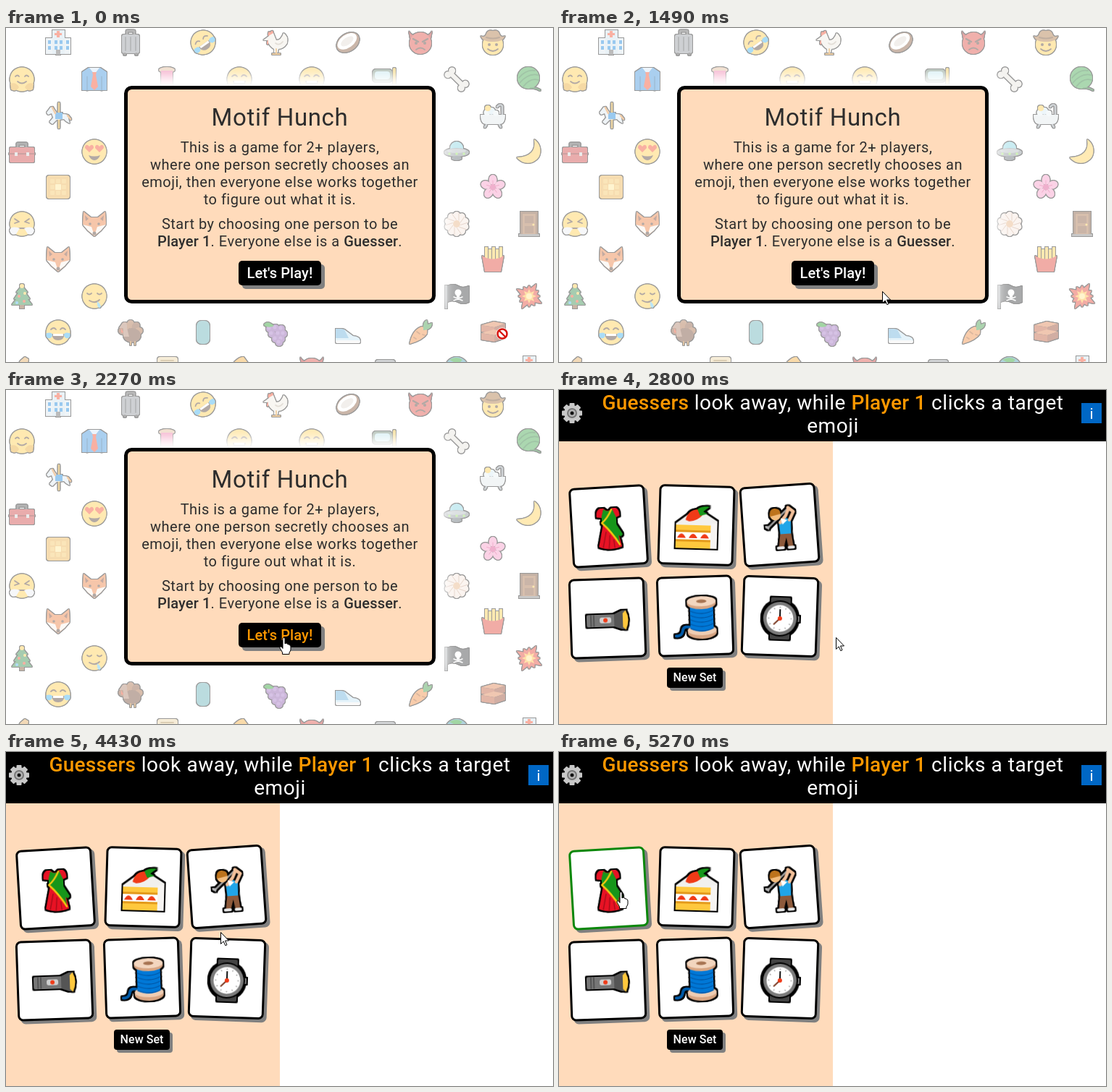
Animation of 755x462 px, one loop 8 s. Source, as an HTML page:

```html
<!DOCTYPE html>
<html lang="en">
<head>
<meta charset="utf-8">
<title>Motif Hunch</title>
<style>
html, body { margin: 0; width: 100%; height: 100%; overflow: hidden; background: #fff; }
svg { display: block; }
text { font-family: Roboto, "Open Sans", sans-serif; letter-spacing: .025em; text-anchor: middle; fill: #2d2d2d; white-space: pre; }
.big { font-size: 33px; letter-spacing: .02em; }
.body { font-size: 20px; }
.strong { font-weight: 500; letter-spacing: .008em; }
.head { font-size: 28px; letter-spacing: .02em; fill: #fff; }
.hot { fill: #ff9800; }
.btn { fill: #fff; }
.label { font-weight: 500; letter-spacing: .005em; }
#wall { opacity: .4; filter: drop-shadow(1px 0 0 #000) drop-shadow(-1px 0 0 #000) drop-shadow(0 1px 0 #000) drop-shadow(0 -1px 0 #000); }
.pic { filter: drop-shadow(2px 0 0 #000) drop-shadow(-2px 0 0 #000) drop-shadow(0 2px 0 #000) drop-shadow(0 -2px 0 #000); }
.face { fill: #fff; stroke: #000; stroke-width: 3; }
.on .face { stroke: #0a870a; }
#glow { filter: blur(8px); }
</style>
</head>
<body>
<svg width="755" height="462" viewBox="0 0 755 462">
  <g id="intro">
    <rect width="755" height="462" fill="#fff"/>
    <g id="wall"></g>
    <rect id="glow" x="150" y="67" width="456" height="327" rx="14" fill="#fff"/>
    <rect x="165.500" y="82.500" width="425" height="296" rx="8" fill="#ffdbbb" stroke="#000" stroke-width="5"/>
    <text class="big" x="378" y="135">Motif Hunch</text>
    <g class="body">
      <text x="378" y="172">This is a game for 2+ players,</text>
      <text x="378" y="196">where one person secretly chooses an</text>
      <text x="378" y="220">emoji, then everyone else works together</text>
      <text x="378" y="244">to figure out what it is.</text>
      <text x="378" y="278">Start by choosing one person to be</text>
      <text x="378" y="302"><tspan class="strong">Player 1</tspan>. Everyone else is a <tspan class="strong">Guesser</tspan>.</text>
      <rect x="326" y="327" width="114" height="34" rx="5" fill="#808080"/>
      <rect x="321" y="322" width="114" height="34" rx="5"/>
      <text id="play" class="btn label" x="378" y="346">Let's Play!</text>
    </g>
  </g>
  <g id="game">
    <rect width="755" height="462" fill="#fff"/>
    <rect y="71" width="378" height="391" fill="#ffdbbb"/>
    <rect width="755" height="71"/>
    <text class="head" x="378" y="27"><tspan class="hot strong">Guessers</tspan> look away, while <tspan class="hot strong">Player 1</tspan> clicks a target</text>
    <text class="head" x="378" y="59">emoji</text>
    <g id="gear" transform="translate(18 32)"></g>
    <rect x="721" y="18" width="28" height="28" fill="#0067c5"/>
    <text x="735.300" y="40" font-size="21" style="fill:#fff">i</text>
    <g id="cards"></g>
    <rect x="153" y="388" width="77" height="28" rx="4" fill="#808080"/>
    <rect x="149" y="384" width="77" height="28" rx="4"/>
    <text class="btn label" x="187.500" y="403" font-size="16">New Set</text>
  </g>
  <g id="cursor">
    <g id="ban" fill="none" stroke="#fff" stroke-width="4">
      <circle r="6.500" fill="#fff"/>
      <path d="M-4.500-4.500L4.500 4.500M6.500 0A6.500 6.500 0 1 1 6.500-.01" stroke="#d8140c" stroke-width="2.400"/>
    </g>
    <path id="arrow" d="M.5.5V16.500L4.200 13L6.800 18.700L9 17.700L6.500 12H11.500Z" fill="#fff" stroke="#000"/>
    <path id="hand" d="M-2 2Q-2 .5-.5 .5Q1 .5 1 2V9Q2 7.800 3.500 8.600Q4.700 8.500 5 10Q6.700 9 7.400 11Q9 10.500 9 13V17Q9 19 7 21V23.500H-2.500V21Q-4 18-6 15Q-6.500 12.500-4.500 13Q-3 13.500-2 15.500Z" fill="#fff" stroke="#000"/>
  </g>
</svg>
<script>
const $ = id => document.getElementById(id);

// shape helpers
const c = (x, y, r, f) => `<circle cx="${x}" cy="${y}" r="${r}" fill="${f}"/>`;
const e = (x, y, rx, ry, f) => `<ellipse cx="${x}" cy="${y}" rx="${rx}" ry="${ry}" fill="${f}"/>`;
const b = (x, y, w, h, f, r = 0) => `<rect x="${x}" y="${y}" width="${w}" height="${h}" rx="${r}" fill="${f}"/>`;
const p = (d, f) => `<path d="${d}" fill="${f}"/>`;
const l = (d, s, w = 1.8) => `<path d="${d}" fill="none" stroke="${s}" stroke-width="${w}" stroke-linecap="round" stroke-linejoin="round"/>`;
const g = (t, s) => `<g transform="${t}">${s}</g>`;
const ring = (n, fn) => Array.from({ length: n }, (_, i) => g(`rotate(${360 / n * i})`, fn(i))).join('');

const Y = '#ffc83d', K = '#402a20', R = '#f03a17', G = '#16961a', B = '#0078d7', W = '#fff';
const ball = c(0, 0, 16.5, Y);
const grin = p('M-9 2H9Q8 11 0 11Q-8 11-9 2Z', K) + b(-7, 2, 14, 3, W);
const shut = l('M-10-4Q-6-8-3-4M3-4Q6-8 10-4', K);
const laugh = ball + grin + shut;
const tear = f => p('M-16 1Q-8-1-8 4Q-9 9-14 8Q-18 6-16 1Z', f);
const petals = (n, f) => ring(n, () => e(0, -10, 5.5, 7, f));
const roof = '#c9dce8';

const icons = {
  hospital: b(-17, -6, 34, 22, '#d8e4ec') + b(-8, -17, 17, 33, roof) + p('M-2-16H2V-13H5V-10H2V-7H-2V-10H-5V-13H-2Z', R)
    + [-14, -5, 2, 11].map(x => b(x, -3, 4, 5, B) + b(x, 5, 4, 5, B)).join('') + b(-3, 10, 6, 7, '#555'),
  bag: l('M-5-10V-16H5V-10', '#555', 2.500) + b(-12, -11, 24, 26, '#858b91', 3) + l('M-7-7V11M0-7V11M7-7V11', '#4e5358', 2) + c(-8, 16, 2, '#333') + c(8, 16, 2, '#333'),
  rofl: g('rotate(-35)', laugh + tear('#2aa8ea') + g('scale(-1 1)', tear('#2aa8ea'))),
  rooster: p('M-17-3L-9-9Q-8-15-3-13L1-3Q8-3 11-13Q18-9 16 1Q11 9 4 9L3 14H-2V9Q-9 5-11-3Z', '#eee9df') + p('M-10-9Q-11-17-7-14Q-4-19-3-13ZM-10-4Q-14 2-10 3Z', R) + l('M1 9V16H-4M1 16H6', '#d88614') + l('M0 1Q5 5 10-1', '#b9ad9c'),
  coconut: g('rotate(-35)', e(0, 0, 17, 12, '#7a4a2a') + e(0, -2, 15, 9, '#fff') + e(0, -2, 10, 5, '#ded8d0')),
  imp: p('M-16-16Q-13-10-8-10L-14-5ZM16-16Q13-10 8-10L14-5Z', '#b8201d') + c(0, 1, 15, '#d93a31') + l('M-10-5L-3-1M10-5L3-1', K, 2.500) + c(-6, 1, 2, K) + c(6, 1, 2, K) + l('M-6 10Q0 5 6 10', K),
  cowboy: c(0, 3, 14, Y) + c(-5, 3, 2, K) + c(5, 3, 2, K) + l('M-7 9Q0 15 7 9', K) + p('M-17-9Q-11-6-9-12Q-7-18 0-16Q7-18 9-12Q11-6 17-9Q13 0 0-1Q-13 0-17-9Z', '#a4662e') + l('M-9-7Q0-4 9-7', '#633713', 2),
  hug: ball + l('M-9-4Q-6-7-4-4M4-4Q6-7 9-4M-6 3Q0 8 6 3', K) + p('M-16 6Q-8 3-4 11Q-9 18-15 14ZM16 6Q8 3 4 11Q9 18 15 14Z', '#e6a01c'),
  shirt: p('M-8-16H8L17-10V15H-17V-10Z', '#2b88d8') + l('M-10-4V15M10-4V15', '#0b4f8a', 1.200) + p('M-7-16H7L0-7Z', '#cfe4f7') + p('M-3-10H3L2-6L5 10L0 15L-5 10L-2-6Z', R),
  spool: e(0, -13, 11, 4, '#d9ac84') + b(-8, -12, 16, 22, '#e8538f') + e(0, 12, 11, 4, '#d9ac84'),
  mask: b(-16, -14, 27, 18, '#4b6b55', 5) + b(-13, -11, 21, 11, '#a8dbe6', 4) + l('M14-14V12H0', '#e6b51c', 4),
  bone: g('rotate(45)', b(-12, -3, 24, 6, '#e4e0da') + [-13, 13].map(x => c(x, -4, 4.500, '#e4e0da') + c(x, 4, 4.500, '#e4e0da')).join('')),
  yarn: c(-1, -2, 15, '#2f9b3b') + l('M-14-2Q-4-14 8-12M-13 5Q-1-9 12-6M-8 10Q2-3 13 1M2 12Q9 11 15 15', '#126b22'),
  horse: l('M1-17V17', '#d49b1a', 2.500) + p('M-16-4L-10-12L-5-8L-1-2H9Q15-2 14 4L16 11L11 8L8 5L-2 6L-8 12L-12 9L-7 3L-9-3L-14-1Z', '#d8e3ea') + p('M-4-4H6V5H-4Z', B) + l('M-8-11L-4-3M13 0L17 5', '#e0862a', 2.500),
  bath: p('M-17-1H17Q17 12 9 12H-9Q-17 12-17-1Z', '#dfe5e9') + l('M-9 13L-11 16M9 13L11 16M13-2V-13Q10-17 6-12', '#8a949b', 2.500) + c(-8, -4, 4.500, '#e7eff3') + c(-2, -6, 5, '#d1e8f2') + c(4, -3, 4, '#e7eff3') + c(-7, -10, 4, Y),
  tool: l('M-6-7V-11H6V-7', '#444', 3) + b(-17, -6, 34, 21, '#c93131', 2) + l('M-17 3H17', '#7f1616', 2) + b(-10, 1, 4, 5, '#ccc') + b(6, 1, 4, 5, '#ccc'),
  love: ball + p('M-7 1L-13-5Q-13-10-9-9L-7-7L-5-9Q-1-10-1-5ZM7 1L13-5Q13-10 9-9L7-7L5-9Q1-10 1-5Z', R) + p('M-8 5Q0 8 8 5Q5 12 0 12Q-5 12-8 5Z', K),
  ufo: e(0, -5, 9, 9, '#7cd0df') + e(0, 1, 17, 6, '#7c858b') + e(0, -1, 13, 3, '#a9b2b7') + [-10, 0, 10].map(x => c(x, 3, 1.800, '#8be04e')).join('') + e(0, 9, 7, 3, '#4e5a63'),
  moon: p('M7-17Q11 7-17 8Q-9 18 4 15Q18 9 15-6Q13-13 7-17Z', '#ffcb45'),
  waffle: b(-16, -16, 32, 32, '#e8a93a', 4) + [-11, -3, 5].map(x => [-11, -3, 5].map(y => b(x, y, 6, 6, '#f2bd50', 1)).join('')).join('') + b(-4, -4, 8, 8, '#ffe48a', 1),
  blossom: petals(5, '#f58fc0') + c(0, 0, 4, '#d83b83') + ring(5, () => l('M0-4V-9', '#d83b83', 1)),
  steam: ball + l('M-10-7L-4-3L-10-1M10-7L4-3L10-1M-4 6H4', K) + p('M-3 6Q-15 2-17 9Q-15 17-8 14ZM3 6Q15 2 17 9Q15 17 8 14Z', '#e8ecef'),
  fox: p('M-15-17L-5-9H5L15-17L16 0L9 9L0 17L-9 9L-16 0Z', '#e8722b') + p('M-16 1L-4 4L0 16L-9 9ZM16 1L4 4L0 16L9 9Z', '#f7efe8') + p('M-13-12L-8-7L-12-4ZM13-12L8-7L12-4Z', '#6b2f17') + c(-6, 0, 1.800, K) + c(6, 0, 1.800, K) + c(0, 13, 2.500, K),
  daisy: petals(10, '#f4e4da') + ring(10, () => l('M3-5V-15', '#b98b72', .8)) + c(0, 0, 5, '#e4ab76'),
  door: b(-12, -17, 24, 33, '#6d3f22') + b(-9, -14, 18, 30, '#9c5f34') + b(-6, -11, 12, 10, '#7a4726') + b(-6, 3, 12, 10, '#7a4726') + c(6, 1, 1.500, Y) + b(-14, 14, 28, 3, '#777'),
  fries: [-11, -6, -1, 4, 9].map((x, i) => b(x, -17 + i % 2 * 3, 4, 20, Y)).join('') + p('M-15-5Q0 4 15-5L11 17H-11Z', '#dc3022'),
  tree: b(-3, 10, 6, 7, '#75451f') + p('M0-15L8-5H5L11 4H8L14 12H-14L-8 4H-11L-5-5H-8Z', '#22813b') + c(0, -14, 3, Y) + c(-4, 0, 2, R) + c(4, -4, 2, Y) + c(3, 7, 2, R) + c(-7, 9, 2, '#3aa7e8'),
  drool: ball + l('M-10-4Q-7-1-4-4M4-4Q7-1 10-4M-7 6Q1 11 7 5', K) + p('M4 7Q11 13 8 16Q3 17 4 7Z', '#54bdec'),
  flag: b(-16, -15, 3, 32, '#70767a') + p('M-13-14Q-4-18 2-14T17-14V8Q9 12 2 8T-13 8Z', '#26282b') + c(2, -5, 4.500, W) + b(0, -2, 4, 4, W) + l('M-4 1L8 6M8 1L-4 6', W, 1.500),
  boom: ring(12, i => p(i % 3 === 1 ? 'M-5-7L0-20L5-7Z' : 'M-5-7L0-15L5-7Z', '#e0301e')) + c(0, 0, 9, '#e0301e') + ring(8, () => p('M-3-3L0-10L3-3Z', '#ffb52c')) + c(0, 0, 4, '#ffe482'),
  joy: laugh + tear('#2aa8ea') + g('scale(-1 1)', tear('#2aa8ea')),
  turkey: ring(9, i => i > 2 && i < 7 ? '' : e(0, -11, 5, 6, i % 2 ? '#7e4526' : '#9f5b31')) + e(2, 4, 12, 10, '#64351f') + p('M-11-13Q-4-16-5-6L-2 6H-10L-10-6L-16-6Z', '#a6735a') + p('M-13-6Q-14 3-10 0Z', R) + l('M0 13V17M6 13V17', '#c77b20'),
  figure: b(-9, -16, 18, 32, '#55a9b0', 7),
  grapes: [[-8, -5], [0, -6], [8, -5], [-5, 2], [4, 2], [11, 2], [0, 9], [8, 9], [5, 14]].map(([x, y]) => c(x, y, 5, '#804ca3') + c(x - 1, y - 1, 2.500, '#9a68bd')).join('') + p('M-2-9Q-12-18-16-10Q-10-5-2-9Z', G),
  shoe: p('M-17-5H-11L-5-4L7 5Q17 6 17 12H-17Z', '#bfe0f2') + p('M-17-5H-11L-5-4L1 8H-17Z', '#5aa9d6') + b(-17, 11, 34, 4, '#f1f1f1', 2),
  carrot: p('M-15 16Q-11-4 2-8Q11-6 9 2Q3 11-15 16Z', '#ee802e') + p('M4-5Q3-15 9-17L10-11L16-13Q16-4 4-3Z', '#2e9236') + l('M-5-1L-1 2M-9 7L-6 9M3 3L6 4', '#a64c10'),
  bricks: [-12, -1].map(y => p(`M-16 ${y + 2}L1 ${y - 3}L17 ${y}L2 ${y + 5}Z`, '#d9743d') + p(`M-16 ${y + 2}L2 ${y + 5}V${y + 14}L-16 ${y + 11}Z`, '#b64a25') + p(`M2 ${y + 5}L17 ${y}V${y + 9}L2 ${y + 14}Z`, '#8c3519')).join(''),
  bread: p('M-2-11L4-16L9-13L8-7Q13 0 9 12H-7Q-10 0-2-11Z', '#dfa04b'),
  scroll: b(-13, -16, 28, 30, '#e9d09b', 4) + l('M-8-11H9', '#a78445'),
  fruit: p('M-7-9Q1-17 6-16Q9-12 14-5Q15 15 0 15Q-15 13-7-9Z', '#f0a228'),
  pipe: b(-12, -12, 27, 26, '#8a9095', 4),
  globe: c(0, 0, 16, '#3b94ad') + p('M-10-12Q0-18 8-12L2-6Z', G),
  grin: laugh,
};

const rows = [
  [20, 72, 'hospital bag rofl rooster coconut imp cowboy'],
  [71, 22, 'hug shirt spool grin grin mask bone yarn'],
  [121, 72, 'horse - - - - - bath'],
  [171, 22, 'tool love - - - - ufo moon'],
  [220, 72, 'waffle - - - - - blossom'],
  [271, 22, 'steam fox - - - - daisy door'],
  [320, 72, 'fox - - - - - fries'],
  [371, 22, 'tree drool - - - - flag boom'],
  [421, 72, 'joy turkey figure grapes shoe carrot bricks'],
  [471, 22, 'bread - scroll fruit imp pipe globe hospital'],
];
$('wall').innerHTML = rows.map(([y, x, names]) => names.split(' ')
  .map((n, i) => n === '-' ? '' : g(`translate(${x + i * 100} ${y})`, icons[n])).join('')).join('');

$('gear').innerHTML = ring(8, () => b(-3.500, -14, 7, 8, '#c8c8c8', 1)) + c(0, 0, 11, '#c8c8c8') + c(0, 0, 7, '#777') + c(0, 0, 5, '#b4b4b4') + c(0, 0, 2.500, '#111');

const dress = p('M-11-28Q-17-25-16-16L-9-15L-8-4L-15 25Q0 32 17 26L11-4V-15L16-17Q16-26 11-28H6Q0-21-6-28Z', '#e81224')
  + l('M-4 5L-9 26M1 10L-1 28M6 16L7 27', '#a80d1a', 1.500)
  + p('M-9-17L-6-27Q0-21 6-27L11-15V-5L19 9L16 12L13 10L14 22Q3 7-9-8Z', G)
  + l('M5-26Q-1-14-9-8Q4 5 14 23', '#f2c811', 2.500);
const cake = p('M-28-5L-6-22H8L29-9V29H-28Z', '#f1f0ee') + b(-28, -3, 48, 32, '#ffc83d') + b(-28, 6, 48, 12, '#fff') + b(-28, 4, 48, 3, '#e39a1c') + b(-28, 17, 48, 3, '#e39a1c')
  + [-20, -4, 12].map(x => p(`M${x - 6} 15Q${x} 3 ${x + 6} 15Z`, R)).join('') + b(20, -6, 9, 35, '#f6f4f2')
  + p('M-15-10Q-12-24 2-25L9-18Q2-9-10-8Z', R) + p('M1-25Q7-30 18-29L9-22L15-19L5-16Z', G);
const golfer = l('M-16 0L14-26', '#9a9a9a', 2.500) + p('M-20-3L-14-2L-15 3L-20 0Z', '#b5b5b5')
  + p('M0 8H15L17 28H10L8 15L4 28H-3Z', '#8d5a3b') + b(-6, 27, 11, 4, '#e7e7e7', 2) + b(9, 27, 10, 4, '#e7e7e7', 2)
  + p('M-1-8L7-13L16-9L15 10H0Z', '#20a5e8') + l('M14-9L20-20L13-26M1-6L9-15L14-25', '#f3c09a', 4.500)
  + c(-5, -17, 7.500, '#f3bd7e') + p('M-13-15Q-13-27-5-26Q3-25 2-18Z', '#bd731c') + p('M2-12L11-9L4-3Z', '#fff');
const torch = b(-29, -8, 40, 17, '#767676', 2) + p('M9-8L20-13H26V13H20L9 9Z', '#555') + p('M25-13Q32 0 25 14L21 10V-9Z', '#ffc83d')
  + l('M-23-7V8M-19-7V8', '#4a4a4a', 1.500) + b(-11, -4, 16, 8, '#d0d0d0', 3) + c(-3, 0, 3, R);
const thread = l('M-4 14Q-17 8-18 18Q-20 25-27 24', '#005aa8', 4) + e(9, 20, 20, 9, '#d7a583') + e(9, 17, 20, 7, '#efcdb3')
  + p('M-7-18H25V15Q9 23-7 15Z', B) + [-10, -4, 2, 8, 14].map(y => l(`M-7 ${y}Q9 ${y + 8} 25 ${y}`, '#0055a4', 1.300)).join('')
  + e(9, -20, 20, 8, '#d7a583') + e(9, -23, 20, 7, '#f3d6bf') + e(9, -23, 7, 2.500, '#a87553');
const watch = b(-13, -29, 27, 58, '#444', 2) + b(21, -4, 6, 8, '#777', 1) + c(0, 0, 25, '#000') + c(0, 0, 23, '#7b7b7b') + c(0, 0, 18.500, '#fff')
  + ring(12, () => l('M0-16V-15', '#777', 1)) + l('M0 0V-12', '#111', 2) + l('M0 0L-8 8', '#7a3b22', 2) + c(0, 0, 3, R);

// x, y, tilt, drawing
const cards = [
  [68.5, 188.5, -3.400, dress], [189.5, 187, 1.700, cake], [304.5, 186.5, -4, golfer],
  [67, 315.5, -2, torch], [188, 312.5, -1.900, thread], [305, 313, 2, watch],
];
const CW = 105, CH = 111;
$('cards').innerHTML = cards.map(([x, y, a, art]) => `<g transform="translate(${x} ${y}) rotate(${a})">`
  + b(4 - CW / 2, 4 - CH / 2, CW, CH, '#808080', 7)
  + `<rect class="face" x="${1.5 - CW / 2}" y="${1.5 - CH / 2}" width="${CW - 3}" height="${CH - 3}" rx="6"/>`
  + `<g class="pic" transform="translate(0 3)">${art}</g></g>`).join('');
const cardEls = [...$('cards').children];

const overCard = (px, py, [x, y, a]) => {
  const r = -a * Math.PI / 180, dx = px - x, dy = py - y;
  return Math.abs(dx * Math.cos(r) - dy * Math.sin(r)) < CW / 2 && Math.abs(dx * Math.sin(r) + dy * Math.cos(r)) < CH / 2;
};

// share of n equal jumps done, the first at t0 and the last at t1
const jumps = (t, t0, t1, n) => t < t0 ? 0 : Math.min(n, Math.floor((t - t0) / (t1 - t0) * (n - 1) + 1e-6) + 1) / n;
const mix = (a, z, k) => a.map((v, i) => Math.round(v + (z[i] - v) * k));

const GAME = 2800, LOOP = 8000;
const rests = [[2800, 382, 342], [3430, 382, 341], [3580, 385, 341], [3810, 384, 340], [3890, 383, 340]];

function pointer(t) {
  if (t < 1330) return mix([685, 423], [486, 380], jumps(t, 500, 1250, 11) ** 1.04);
  if (t < 2270) return mix([487, 377], [382, 343], 1 - (1 - jumps(t, 1330, 2020, 10)) ** 1.4);
  if (t < GAME) return [384, 342];
  if (t < 4120) return rests.filter(r => r[0] <= t).pop().slice(1);
  const n = jumps(t, 4120, 5270, 16) * 16;
  if (n <= 5) return mix([383, 340], [296, 249], n / 5);
  const q = (n - 5) / 11;
  return [Math.round(296 - 210 * q), Math.round(249 - 56 * q * q)];
}

const show = (id, on) => { $(id).style.display = on ? '' : 'none'; };

function draw() {
  const t = performance.now() % LOOP, game = t >= GAME, [x, y] = pointer(t);
  const onPlay = !game && t >= 1330 && x > 321 && x < 435 && y > 322 && y < 356;
  let hover = onPlay;
  cardEls.forEach((el, i) => {
    const on = game && overCard(x, y, cards[i]);
    el.classList.toggle('on', on);
    hover = hover || on;
  });
  show('intro', !game);
  show('game', game);
  $('play').classList.toggle('hot', onPlay);
  $('play').classList.toggle('btn', !onPlay);
  show('ban', t < 1330);
  show('arrow', t >= 1330 && !hover);
  show('hand', hover);
  $('cursor').setAttribute('transform', `translate(${x} ${y})`);
  requestAnimationFrame(draw);
}
draw();
</script>
</body>
</html>
```
